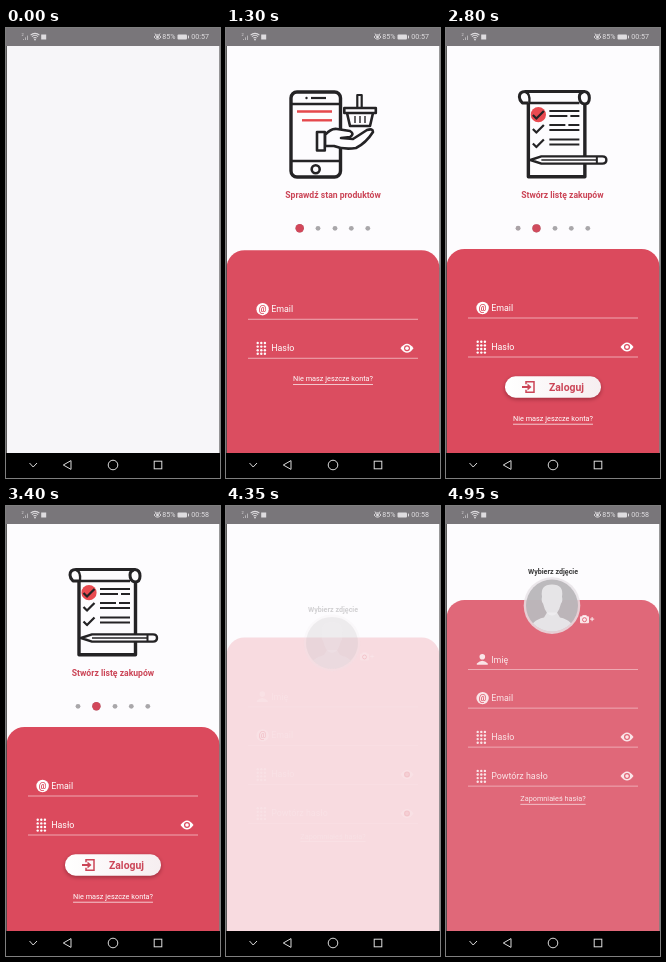
Write an HTML page with a canvas that moves like this. It is 214 by 450 pixels and loops after 5000 ms.

```html
<!DOCTYPE html>
<html lang="pl">
<head>
<meta charset="utf-8">
<title>Logowanie</title>
<style>
html, body { margin: 0; width: 100%; height: 100%; overflow: hidden; background: #000; }
canvas { display: block; width: 214px; height: 450px; }
</style>
</head>
<body>
<canvas id="stage"></canvas>
<script>
const W = 214, H = 450, LOOP = 5000, STEP = 50;
const BAR = 18, NAV = 425, RISE = 58, FADE = 1350;
const RED = '#db4a5d', DARK = '#cb4557', INK = '#242325', PAPER = '#fdfcfe';
const canvas = document.getElementById('stage');
const ratio = window.devicePixelRatio || 1;
canvas.width = W * ratio;
canvas.height = H * ratio;
const c = canvas.getContext('2d');

const clamp = v => Math.max(0, Math.min(1, v));
const ease = v => (1 - Math.cos(Math.PI * clamp(v))) / 2;
const mix = (a, b, k) => a + (b - a) * k;

function rect(x, y, w, h, fill) {
  c.fillStyle = fill;
  c.fillRect(x, y, w, h);
}

function round(x, y, w, h, r) {
  c.beginPath();
  c.roundRect(x, y, w, h, r);
}

function disc(x, y, r, fill) {
  c.fillStyle = fill;
  c.beginPath();
  c.arc(x, y, r, 0, 7);
  c.fill();
}

function ring(x, y, r, color, width) {
  c.strokeStyle = color;
  c.lineWidth = width;
  c.beginPath();
  c.arc(x, y, r, 0, 7);
  c.stroke();
}

function line(points, color, width, close) {
  c.strokeStyle = color;
  c.lineWidth = width;
  c.beginPath();
  for (let i = 0; i < points.length; i += 2) c.lineTo(points[i], points[i + 1]);
  if (close) c.closePath();
  c.stroke();
}

function drawPath(d, color, width) {
  c.strokeStyle = color;
  c.lineWidth = width;
  c.stroke(new Path2D(d));
}

function fillPath(d, color) {
  c.fillStyle = color;
  c.fill(new Path2D(d));
}

function text(s, x, y, size, color, align = 'left', weight = 400) {
  c.font = `${weight} ${size}px Roboto, sans-serif`;
  c.textAlign = align;
  c.textBaseline = 'middle';
  c.fillStyle = color;
  c.fillText(s, x, y);
  return c.measureText(s).width;
}

function at(x, y, draw) {
  c.save();
  c.translate(x, y);
  draw();
  c.restore();
}

function statusBar(t) {
  const pale = '#dedcdf';
  rect(0, 0, W, BAR, '#79767a');
  text('2', 15.5, 6.5, 4, pale);
  for (let i = 0; i < 3; i++) rect(17 + i * 2, 11 - i * 1.7, 1, 1 + i * 1.7, '#b5b3b6');
  c.lineCap = 'butt';
  for (const r of [2.4, 4.6, 6.6]) {
    c.strokeStyle = pale;
    c.lineWidth = 1.1;
    c.beginPath();
    c.arc(29, 12, r, -2.3, -0.84);
    c.stroke();
  }
  disc(29, 11.6, 0.9, pale);
  rect(35.2, 6.5, 5, 5, pale);
  drawPath('M148 9Q151.5 4.5 155 9Q151.5 13.5 148 9ZM149 5.5L150 7M154 5.5L153 7', pale, 0.9);
  disc(151.5, 9, 1.4, pale);
  text('85%', 156.3, 9.4, 7.1, pale);
  round(171.5, 6.4, 9.5, 5.2, 1);
  c.fillStyle = pale;
  c.fill();
  rect(182, 7.6, 1, 2.8, pale);
  text(t < 2950 ? '00:57' : '00:58', 185.3, 9.4, 7.1, pale);
}

function navBar() {
  const pale = '#dcdcdc';
  rect(0, NAV, W, H - NAV, '#000');
  line([23.5, 435, 27.2, 439, 31, 435], pale, 1);
  line([57.3, 437, 65, 432.6, 65, 441.4], pale, 1, true);
  ring(107, 437, 4.8, pale, 1);
  c.strokeRect(148.2, 433.2, 7.6, 7.6);
}

function shopArt() {
  c.lineJoin = 'round';
  round(65, 64, 49.5, 85, 6);
  c.strokeStyle = INK;
  c.lineWidth = 3.4;
  c.stroke();
  line([65, 76, 114, 76], INK, 2.4);
  line([65, 133, 114, 133], INK, 2.4);
  line([85, 70, 100, 70], INK, 2.2);
  disc(80.5, 70, 1.2, INK);
  ring(89.7, 141.3, 4, INK, 2.6);
  line([71, 83.5, 106, 83.5], '#e5484d', 2.4);
  line([76, 92.3, 106, 92.3], '#e5484d', 2.4);
  // hand
  const hand = 'M99 107Q105 100 111 101L124 103Q129 106 124 109L115 110L127 111L141 102Q147 100 147 104Q140 115 130 120Q118 122 108 118L99 118Z';
  fillPath(hand, PAPER);
  drawPath(hand, INK, 2.6);
  rect(91, 104, 8, 19, PAPER);
  line([91, 104, 98.8, 104, 98.8, 122.5, 91, 122.5], INK, 2.6, true);
  // basket
  drawPath('M121 85L124 98H144L147 85', INK, 2.6);
  c.strokeRect(118.3, 80, 31.5, 5);
  line([131.3, 79, 131.3, 67, 135.7, 67, 135.7, 79], INK, 2.2);
  for (const x of [129, 134, 139]) line([x, 88, x, 95], INK, 1.4);
  text('Sprawdź stan produktów', 107, 167.5, 8.65, DARK, 'center', 700);
}

function tick(x, y) {
  line([x - 5, y, x - 1.5, y + 3.6, x + 6, y - 4], INK, 2.2);
}

function listArt() {
  c.lineJoin = 'round';
  drawPath('M73 75V148.8H129.5V76', INK, 3.4);
  drawPath('M73 75H67Q64 72 64 69Q64 63.5 70 63.5H129Q134 64 134 70Q134 76 129 76Q124 75 124 69Q124 65 128 64', INK, 3);
  drawPath('M70 64Q75 65 74 75H124', INK, 2.4);
  disc(83, 86.7, 7.6, '#e94a50');
  for (const [i, y] of [87, 101, 115.5].entries()) {
    tick(82.5, y);
    line([94, y - 4, i === 1 ? 110 : 124, y - 4], INK, 2);
    if (i === 1) line([113, y - 4, 124, y - 4], INK, 2);
    line([94, y + 1, i ? 124 : 112, y + 1], INK, 2);
    if (!i) line([115, y + 1, 124, y + 1], INK, 2);
  }
  const pencil = 'M75 132L86 128.4H147Q151 128.4 151 132Q151 135.6 147 135.6H86Z';
  fillPath(pencil, PAPER);
  drawPath(pencil, INK, 2.4);
  line([86, 132, 141, 132], INK, 1.5);
  line([141.5, 128, 141.5, 136], INK, 2);
  text('Stwórz listę zakupów', 107, 167.5, 8.65, DARK, 'center', 700);
}

function swipe(t) {
  if (t < 2500) return 0.3 * clamp((t - 2350) / 150);
  return 1 - 0.7 * (1 - clamp((t - 2500) / 600)) ** 4;
}

function slider(t) {
  const s = swipe(t);
  if (s < 1) at(-s * W, 0, shopArt);
  if (s > 0) at((1 - s) * W, 0, listArt);
  const xs = [mix(73.7, 72, s), mix(92, 90.4, s), 109, 125.3, 141.8];
  xs.forEach((x, i) => {
    const k = i === 0 ? 1 - s : i === 1 ? s : 0;
    disc(x, 200.3, mix(2.4, 4.2, k), '#a9a7aa');
    if (k) {
      c.save();
      c.globalAlpha *= k;
      disc(x, 200.3, mix(2.4, 4.2, k), '#d2475a');
      c.restore();
    }
  });
}

function eye(y) {
  fillPath(`M174.5 ${y}Q181 ${y - 9} 187.5 ${y}Q181 ${y + 9} 174.5 ${y}Z`, '#fff');
  disc(181, y, 3, RED);
  disc(181, y, 1.8, '#fff');
}

const icons = {
  mail(y) {
    disc(36.6, y, 6.2, '#fff');
    text('@', 36.6, y + 0.1, 8.6, RED, 'center', 700);
  },
  keys(y) {
    for (let i = 0; i < 12; i++) disc(31.7 + i % 3 * 3.6, y - 5.2 + Math.floor(i / 3) * 3.6, 1.2, '#fff');
    eye(y);
  },
  user(y) {
    disc(36.3, y - 2.8, 2.8, '#fff');
    fillPath(`M30.8 ${y + 5.2}V${y + 3.8}Q36.3 ${y - 1.6} 41.8 ${y + 3.8}V${y + 5.2}Z`, '#fff');
  }
};

function field(label, icon, y) {
  icons[icon](y);
  text(label, 45.2, y + 0.4, 8.9, '#fff');
  rect(22, y + 9.6, 170, 0.8, 'rgba(255,255,255,.65)');
}

function link(s, y) {
  const w = text(s, 107, y, 7.3, '#fff', 'center');
  rect(107 - w / 2, y + 4.8, w, 0.7, '#fff');
}

function panel(top) {
  round(0.5, top, W - 1, NAV - top + 30, [18, 18, 0, 0]);
  c.fillStyle = RED;
  c.fill();
}

function loginButton(k) {
  if (k <= 0) return;
  const y = 359 - (1 - k) * RISE;
  c.save();
  c.globalAlpha = k;
  c.shadowColor = 'rgba(60,0,10,.4)';
  c.shadowBlur = 4 * ratio;
  c.shadowOffsetY = 1.5 * ratio;
  const shade = c.createLinearGradient(59, 0, 155, 0);
  shade.addColorStop(0, '#fff');
  shade.addColorStop(1, '#f6eef0');
  round(59, y - 10.7, 96, 21.4, 10.5);
  c.fillStyle = shade;
  c.fill();
  c.shadowColor = 'transparent';
  line([80, y - 2.7, 80, y - 5.2, 88, y - 5.2, 88, y + 5.2, 80, y + 5.2, 80, y + 2.7], DARK, 1.5);
  line([76, y, 83, y], DARK, 2);
  fillPath(`M81.5 ${y - 3.6}L85.5 ${y}L81.5 ${y + 3.6}Z`, DARK);
  text('Zaloguj', 103, y + 0.5, 10.4, DARK, 'left', 700);
  c.restore();
}

function loginScreen(t) {
  rect(0, BAR, W, H, PAPER);
  slider(t);
  const k = ease((t - 75) / FADE);
  const top = 221 + (1 - k) * RISE;
  c.save();
  c.globalAlpha = k;
  panel(top);
  field('Email', 'mail', top + 59);
  field('Hasło', 'keys', top + 98);
  link('Nie masz jeszcze konta?', top + (t < 1700 ? 129 : 170));
  c.restore();
  loginButton(ease((t - 1650) / 660));
}

function avatar(y) {
  disc(106, y, 28.3, '#e9e4e7');
  c.save();
  c.beginPath();
  c.arc(106, y, 26, 0, 7);
  c.clip();
  rect(78, y - 28, 56, 56, '#b3b1b4');
  at(106, y, () => {
    fillPath('M-23 28Q-22 15 -8 12L-5 7H5L8 12Q22 15 23 28Z', '#f0eff1');
    fillPath('M-10 -9Q-12 -21 0 -21Q12 -21 10 -9Q11 -4 9 -2Q6 10 0 10Q-6 10 -9 -2Q-11 -4 -10 -9Z', '#f0eff1');
  });
  c.restore();
}

function camera(y) {
  round(134, y - 2.8, 9, 7, 1);
  c.fillStyle = '#fff';
  c.fill();
  rect(136.4, y - 4, 4.2, 2, '#fff');
  ring(138.5, y + 0.6, 2, RED, 0.9);
  line([144, y, 148.2, y], '#fff', 1);
  line([146.1, y - 2.1, 146.1, y + 2.1], '#fff', 1);
}

function registerScreen(t) {
  rect(0, BAR, W, H, PAPER);
  const k = ease((t - 3970) / FADE);
  const top = 84 + (1 - k) * RISE;
  c.save();
  c.globalAlpha = k;
  panel(top);
  text('Wybierz zdjęcie', 107, top - 27.7, 7.1, '#111', 'center', 700);
  avatar(top + 5.5);
  camera(top + 19);
  field('Imię', 'user', top + 59.5);
  field('Email', 'mail', top + 98);
  field('Hasło', 'keys', top + 137);
  field('Powtórz hasło', 'keys', top + 176);
  link('Zapomniałeś hasła?', top + 199);
  c.restore();
}

function render(t) {
  c.setTransform(ratio, 0, 0, ratio, 0, 0);
  c.globalAlpha = 1;
  if (t < 150) {
    rect(0, 0, W, H, '#f7f6f9');
  } else if (t < 3950) {
    loginScreen(t);
  } else {
    // the new screen is uncovered from below over the dimmed old one
    const fall = Math.exp((3950 - t) / 45);
    const edge = t > 4200 ? BAR : BAR + 208 * fall;
    if (edge > BAR) {
      at(0, -4 - 5 * (1 - fall), () => loginScreen(t));
      rect(0, 0, W, H, 'rgba(0,0,0,.1)');
    }
    c.save();
    c.beginPath();
    c.rect(0, edge, W, H);
    c.clip();
    registerScreen(t);
    c.restore();
  }
  rect(0, BAR, 0.8, NAV - BAR, '#333');
  rect(W - 0.6, BAR, 0.6, NAV - BAR, '#555');
  statusBar(t);
  navBar();
}

const start = performance.now();
function tickFrame() {
  const t = (performance.now() - start) % LOOP;
  render(Math.floor(t / STEP) * STEP);
  requestAnimationFrame(tickFrame);
}
tickFrame();
</script>
</body>
</html>
```
